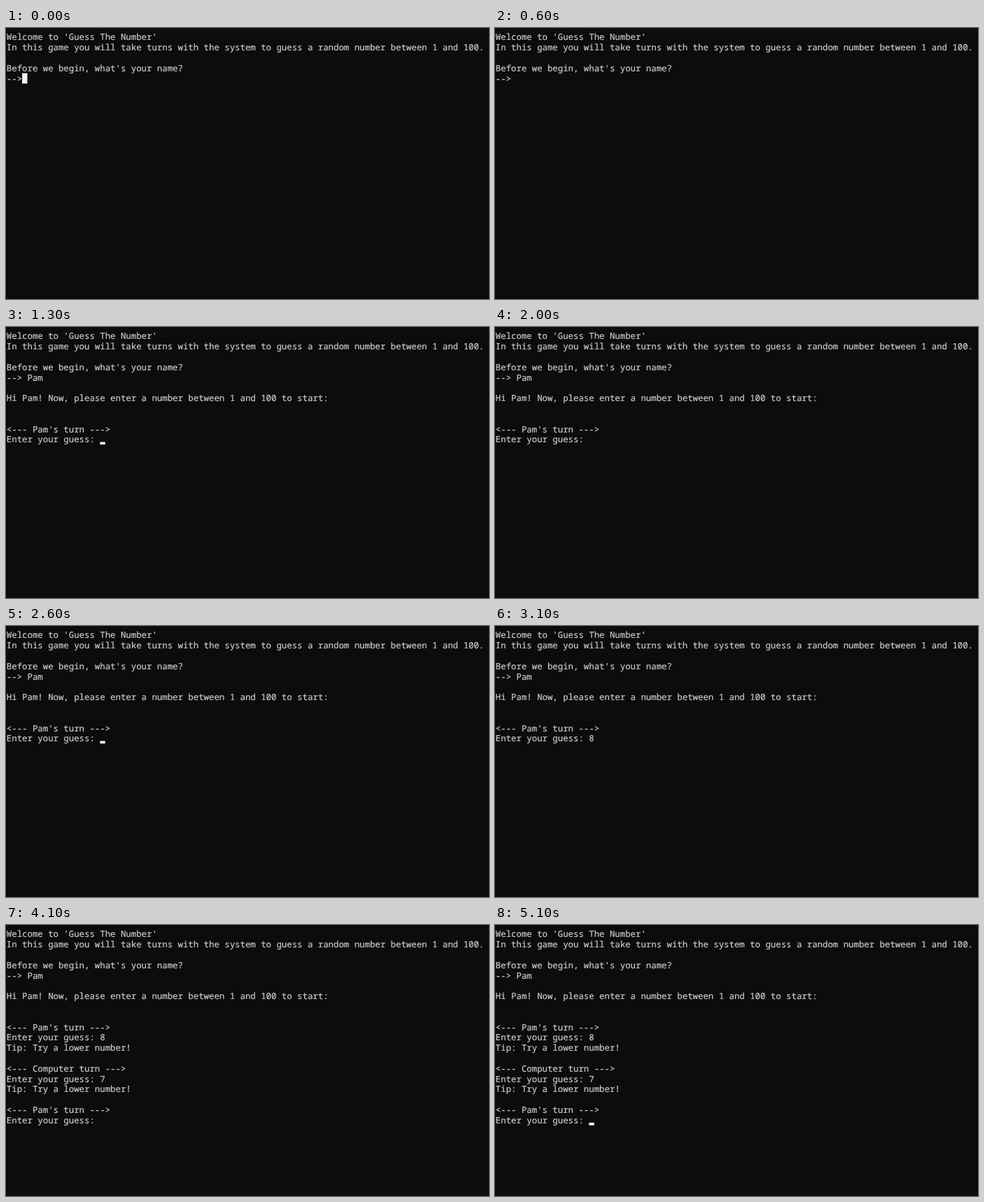
An HTML page with a canvas that plays this animation: 690x388 px, repeating every 5.2 s.

```html
<!DOCTYPE html>
<html lang="en">
<head>
<meta charset="utf-8">
<title>Guess The Number</title>
<style>
html, body { margin: 0; width: 100%; height: 100%; overflow: hidden; background: #0c0c0c; }
canvas { display: block; }
</style>
</head>
<body>
<canvas id="stage" width="690" height="388"></canvas>
<script>
const ctx = document.getElementById('stage').getContext('2d');
const LOOP = 5200;
const CELL_W = 7.416, CELL_H = 14.8;
const LEFT = 0.8, TOP = 5.5, BASELINE = 11.9;
const FONT_SIZE = CELL_W / 0.6;
const PLAYER = 'Pam';

const PROMPT = 'Enter your guess: ';
const TIP = 'Tip: Try a lower number!';
const INTRO = [
  "Welcome to 'Guess The Number'",
  'In this game you will take turns with the system to guess a random number between 1 and 100.',
  '',
  "Before we begin, what's your name?"
];
const turn = who => `<--- ${who} turn --->`;
const playerTurn = turn(PLAYER + "'s");
const greeting = ['', `Hi ${PLAYER}! Now, please enter a number between 1 and 100 to start:`, '', ''];
const reply = [TIP, '', turn('Computer'), PROMPT + '7', TIP, '', playerTurn, PROMPT];

const within = (t, from, to) => t >= from && t < to;

// Name typed so far, including the space after the arrow
function typedName(t) {
  if (t < 800) return ' ';
  return ' ' + PLAYER.slice(0, t < 900 ? 2 : 3);
}

function screenLines(t) {
  const lines = [...INTRO, '-->' + typedName(t)];
  if (t >= 1300) lines.push(...greeting, playerTurn, PROMPT + (t >= 3000 ? '8' : ''));
  if (t >= 3300) lines.push(...reply);
  return lines;
}

function cursorShown(t) {
  return within(t, 400, 600) || within(t, 800, 1000) ||
    within(t, 1300, 2000) || within(t, 2600, 3100) ||
    within(t, 3300, 4100) || t >= 4700;
}

function fillCell(col, row, part) {
  const h = CELL_H * part;
  ctx.fillStyle = '#f2f2f2';
  ctx.fillRect(LEFT + col * CELL_W, TOP + (row + 1) * CELL_H - h, CELL_W, h);
}

// A hairline outline gives the letters console weight
function drawLine(line, row) {
  const y = TOP + row * CELL_H + BASELINE;
  ctx.fillText(line, LEFT, y);
  ctx.strokeText(line, LEFT, y);
}

function draw(t) {
  ctx.fillStyle = '#0c0c0c';
  ctx.fillRect(0, 0, 690, 388);

  const lines = screenLines(t);
  ctx.font = `${FONT_SIZE}px "Noto Sans Mono", "DejaVu Sans Mono", monospace`;
  ctx.textRendering = 'geometricPrecision';
  ctx.fillStyle = ctx.strokeStyle = '#cccccc';
  ctx.lineWidth = 0.2;
  lines.forEach(drawLine);

  const row = lines.length - 1;
  if (t < 600) fillCell(3, row, 1);
  if (cursorShown(t)) fillCell(lines[row].length, row, 0.25);
}

const start = performance.now();
function tick() {
  draw((performance.now() - start) % LOOP);
  requestAnimationFrame(tick);
}
tick();
</script>
</body>
</html>
```
